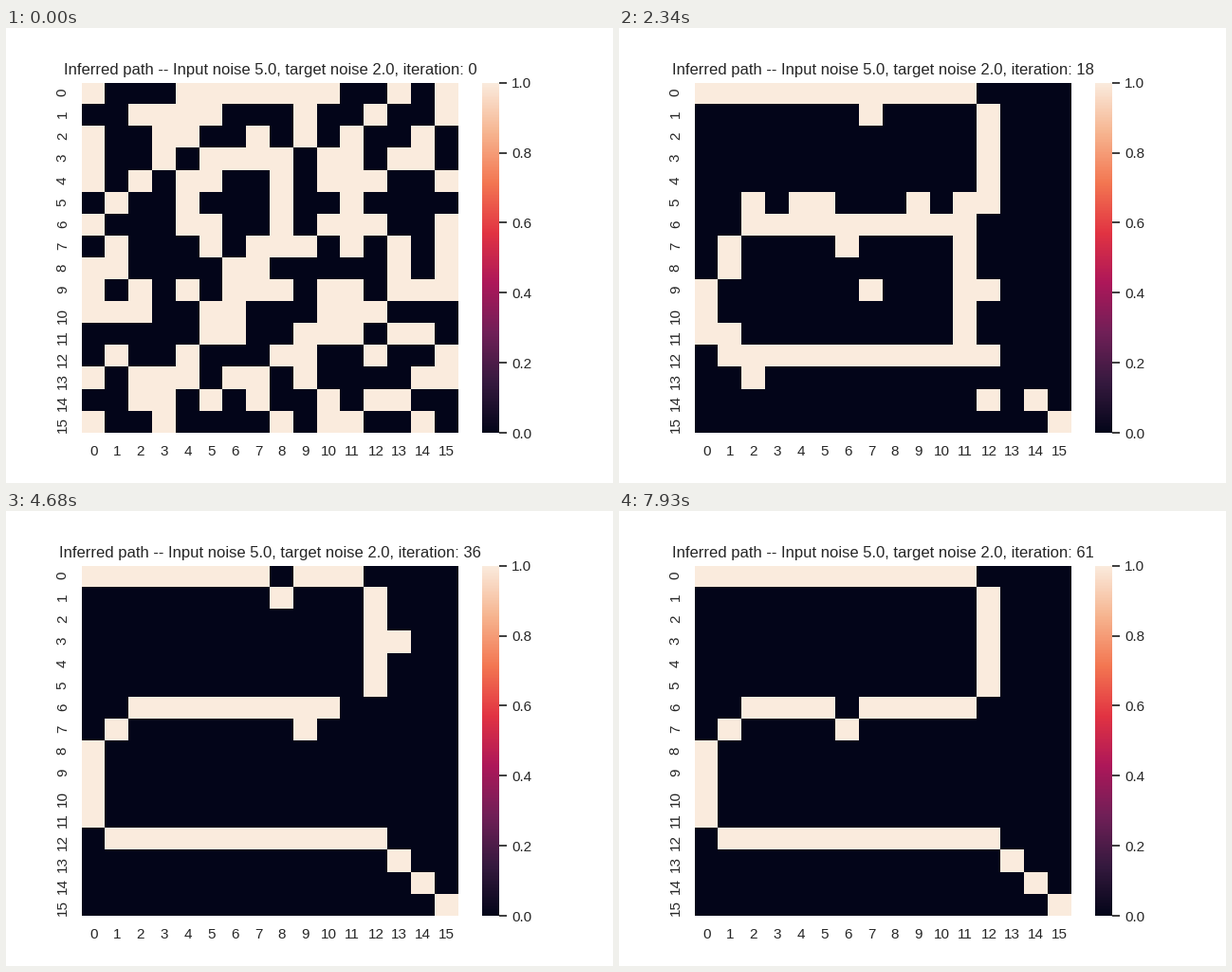
Recreate the animation shown at these times as a matplotlib script. Size 640 px wide and 480 px high, loop 8000 ms.

```python
from itertools import product

import matplotlib.pyplot as plt
import numpy as np
from matplotlib.animation import FuncAnimation
from matplotlib.colors import LinearSegmentedColormap

N = 16
LOOP_MS, TICK_MS, HOLD_MS = 8000, 40, 130
STEM_UNTIL, SETTLED, DETOUR_EVERY = 24, 25, 23
INK = "#262626"

plt.rcParams.update({
    "font.family": "Liberation Sans",
    "text.color": INK,
    "xtick.color": INK,
    "ytick.color": INK,
    "axes.titlesize": 12,
    "xtick.labelsize": 11,
    "ytick.labelsize": 11,
})

ROCKET = LinearSegmentedColormap.from_list("rocket", [
    "#030519", "#35193e", "#701f57", "#ad1759",
    "#e13342", "#f37651", "#f6b48f", "#faebdd",
])


def trace(*corners):
    """Light up the cells along a path of (row, column) corners."""
    g = np.zeros((N, N), bool)
    for a, b in zip(corners, corners[1:]):
        n = np.abs(np.subtract(b, a)).max() + 1
        g[tuple(np.linspace(a, b, n).round().astype(int).T)] = True
    return g


def widen(g):
    """Add every cell that touches a lit one."""
    p = np.pad(g, 1)
    return np.any([p[r:r + N, c:c + N]
                   for r, c in product(range(3), repeat=2)], axis=0)


top = trace((0, 0), (0, 11), (1, 12), (5, 12), (6, 11))
winding = top | trace((6, 11), (6, 2), (8, 0), (11, 0), (12, 1), (12, 12),
                      (15, 15))
detour = top | trace((6, 11), (9, 14), (10, 13), (11, 13), (12, 12), (13, 13),
                     (14, 13), (14, 14), (15, 15))
stem = trace((5, 11), (12, 11))


def push(g, rng):
    """Move one cell of a straight stretch to the row beside it."""
    row, col = rng.choice((0, 6, 12)), rng.integers(3, 11)
    side = 1 if row == 0 else rng.choice((-1, 1))
    if g[row, col]:
        g[row, col], g[row + side, col] = False, True


def cells(k):
    """The path at iteration k: noise fades, slowest beside the route."""
    rng = np.random.default_rng(k)
    g = (winding if k % DETOUR_EVERY else detour).copy()
    if k < STEM_UNTIL:
        g |= stem
    fade = np.where(widen(g), 10, 5)
    g ^= rng.random((N, N)) < 0.5 * np.exp(-k / fade)
    if k > SETTLED:
        push(g, rng)
    return g


fig = plt.figure(figsize=(6.4, 4.8), dpi=100, facecolor="white")
ax = fig.add_axes([0.125, 0.11, 0.62, 0.77])
cax = fig.add_axes([0.78375, 0.11, 0.028875, 0.77])

# Inner edges sit just under half a pixel early, so they round down
edges = np.arange(N + 1.0)
edges[1:-1] -= 0.019
mesh = ax.pcolormesh(edges, edges, cells(0).astype(float), cmap=ROCKET,
                     vmin=0, vmax=1)
ax.set(xlim=(0, N), ylim=(N, 0))
ax.set_xticks(np.arange(N) + 0.5, range(N))
ax.set_yticks(np.arange(N) + 0.5, range(N), rotation="vertical")
ax.tick_params(length=6, left=False, bottom=False)
ax.spines[:].set_visible(False)
title = ax.set_title("")

bar = fig.colorbar(mesh, cax=cax)
bar.outline.set_linewidth(0)
bar.set_ticks(np.linspace(0, 1, 6))
cax.tick_params(length=6, width=1.25)


def update(i):
    # Look ahead within the tick so no iteration shows late
    k = (i * TICK_MS + TICK_MS - 10) // HOLD_MS
    mesh.set_array(cells(k).astype(float))
    title.set_text("Inferred path -- Input noise 5.0, "
                   f"target noise 2.0, iteration: {k}")
    return mesh, title


anim = FuncAnimation(fig, update, frames=LOOP_MS // TICK_MS,
                     interval=TICK_MS, repeat=True, repeat_delay=0)
plt.show()
```
